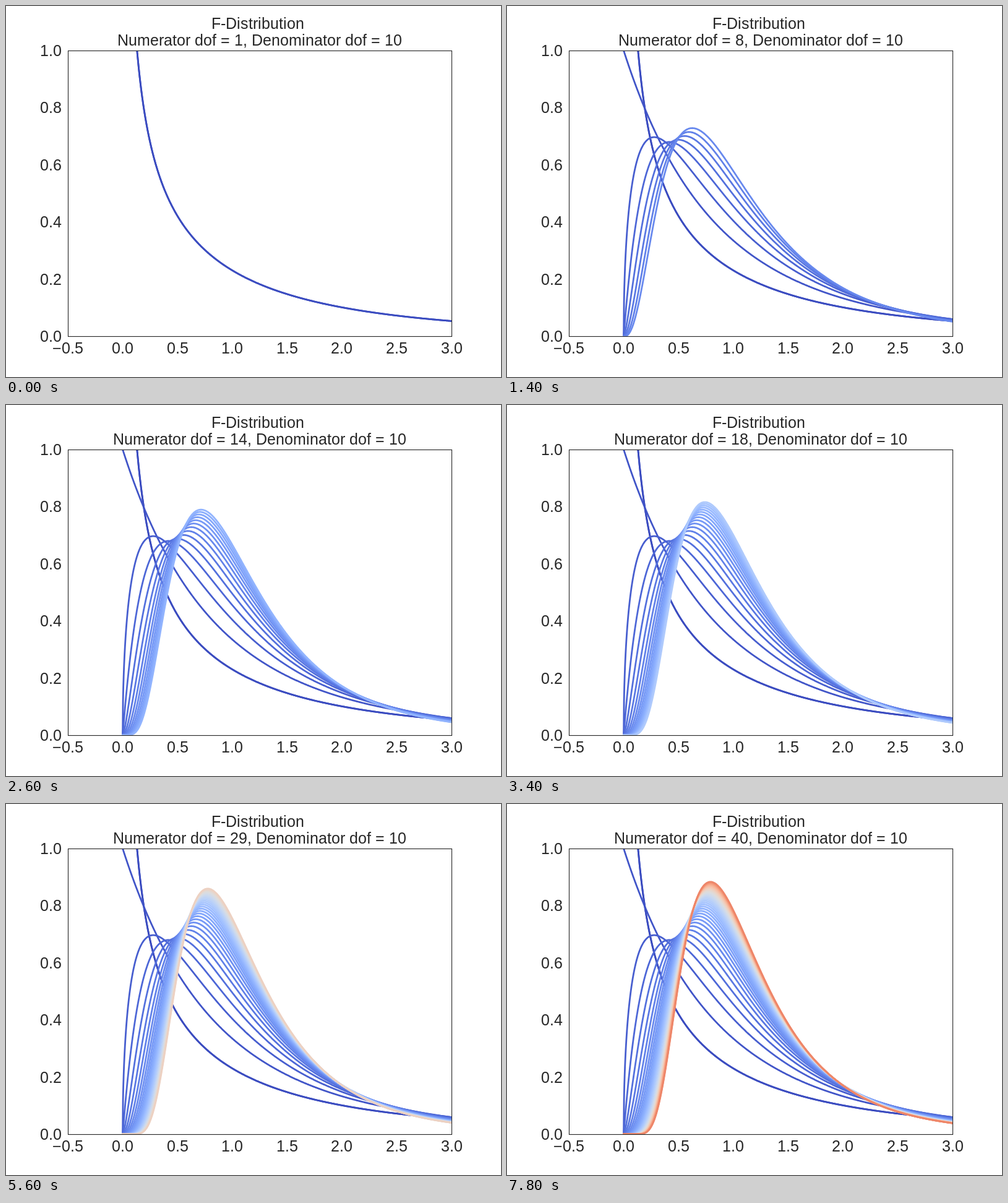
Write an HTML page with a canvas that moves like this. It is 800 by 600 pixels and loops after 8 s.

```html
<!DOCTYPE html>
<html lang="en">
<head>
<meta charset="utf-8">
<title>F-Distribution</title>
<style>
  html, body { margin: 0; width: 100%; height: 100%; overflow: hidden; background: #fff; }
  canvas { display: block; }
</style>
</head>
<body>
<canvas id="stage" width="800" height="600"></canvas>
<script>
const ctx = document.getElementById('stage').getContext('2d');

const LOOP = 8000, STEP = 200;
const BOX = { left: 100, top: 72, right: 720, bottom: 534 };
const X_MIN = -0.5, X_MAX = 3;
const DEN = 10;
const INK = '#262626';

// Diverging blue-to-red ramp, one stop every 1/16.
const RAMP = [
  [59, 76, 192], [77, 104, 215], [98, 130, 234], [119, 154, 247],
  [141, 176, 254], [163, 194, 255], [184, 208, 249], [204, 217, 238],
  [221, 221, 221], [236, 211, 197], [245, 196, 173], [247, 177, 148],
  [244, 154, 123], [236, 127, 99]
];

const toX = v => BOX.left + (v - X_MIN) / (X_MAX - X_MIN) * (BOX.right - BOX.left);
const toY = v => BOX.bottom - v * (BOX.bottom - BOX.top);

function rampColor(u) {
  const i = Math.min(Math.floor(u * 16), RAMP.length - 2);
  const f = u * 16 - i;
  const rgb = RAMP[i].map((c, k) => Math.round(c + (RAMP[i + 1][k] - c) * f));
  return `rgb(${rgb})`;
}

// Density of F(num, DEN); 1 / Beta(a, 5) is a(a+1)(a+2)(a+3)(a+4) / 4!.
function density(num) {
  const a = num / 2, r = num / DEN;
  const scale = a * (a + 1) * (a + 2) * (a + 3) * (a + 4) / 24 * r ** a;
  return x => scale * x ** (a - 1) * (1 + r * x) ** -(a + DEN / 2);
}

function makeCurve(num) {
  const path = new Path2D(), f = density(num), dx = 0.003;
  for (let i = num === 1 ? 1 : 0; i <= 1000; i++) {
    path.lineTo(toX(i * dx), toY(f(i * dx)));
  }
  return { path, color: rampColor((num - 1) / 49) };
}

const curves = Array.from({ length: LOOP / STEP }, (_, i) => makeCurve(i + 1));

// Sets text on whole-pixel glyph advances; align is 0 left, 0.5 centre, 1 right.
function label(text, x, y, align) {
  const advances = [...text].map(c => Math.round(ctx.measureText(c).width));
  const width = advances.reduce((sum, w) => sum + w, 0);
  let pen = Math.round(x - width * align);
  [...text].forEach((c, i) => {
    ctx.fillText(c, pen, y);
    pen += advances[i];
  });
}

function drawLabels(num) {
  ctx.font = '25px "Liberation Sans", Arial, sans-serif';
  ctx.fillStyle = INK;
  label('F-Distribution ', 410, 37, 0.5);
  label(`Numerator dof = ${num}, Denominator dof = ${DEN}`, 410, 64, 0.5);
  for (let i = 0; i <= 5; i++) {
    label((i / 5).toFixed(1), 90, Math.round(toY(i / 5)) + 9, 1);
  }
  for (let v = X_MIN; v <= X_MAX; v += 0.5) {
    label(v.toFixed(1).replace('-', '\u2212'), toX(v), 562, 0.5);
  }
}

function drawCurves(num) {
  const w = BOX.right - BOX.left, h = BOX.bottom - BOX.top;
  ctx.save();
  ctx.beginPath();
  ctx.rect(BOX.left, BOX.top, w, h);
  ctx.clip();
  ctx.lineWidth = 2.78;
  ctx.lineJoin = 'round';
  ctx.lineCap = 'square';
  // The opening curve is laid down twice, which firms up its edges.
  for (const { path, color } of [curves[0], ...curves.slice(0, num)]) {
    ctx.strokeStyle = color;
    ctx.stroke(path);
  }
  ctx.restore();
  ctx.strokeStyle = INK;
  ctx.lineWidth = 1.11;
  ctx.strokeRect(BOX.left + 0.5, BOX.top + 0.5, w, h);
}

function draw(num) {
  ctx.fillStyle = '#fff';
  ctx.fillRect(0, 0, 800, 600);
  drawCurves(num);
  drawLabels(num);
}

let shown = 0;
const start = performance.now();

function tick(now) {
  const t = Math.max(0, now - start) % LOOP;
  const num = 1 + Math.floor(t / STEP);
  if (num !== shown) draw(shown = num);
  requestAnimationFrame(tick);
}
tick(start);
</script>
</body>
</html>
```
